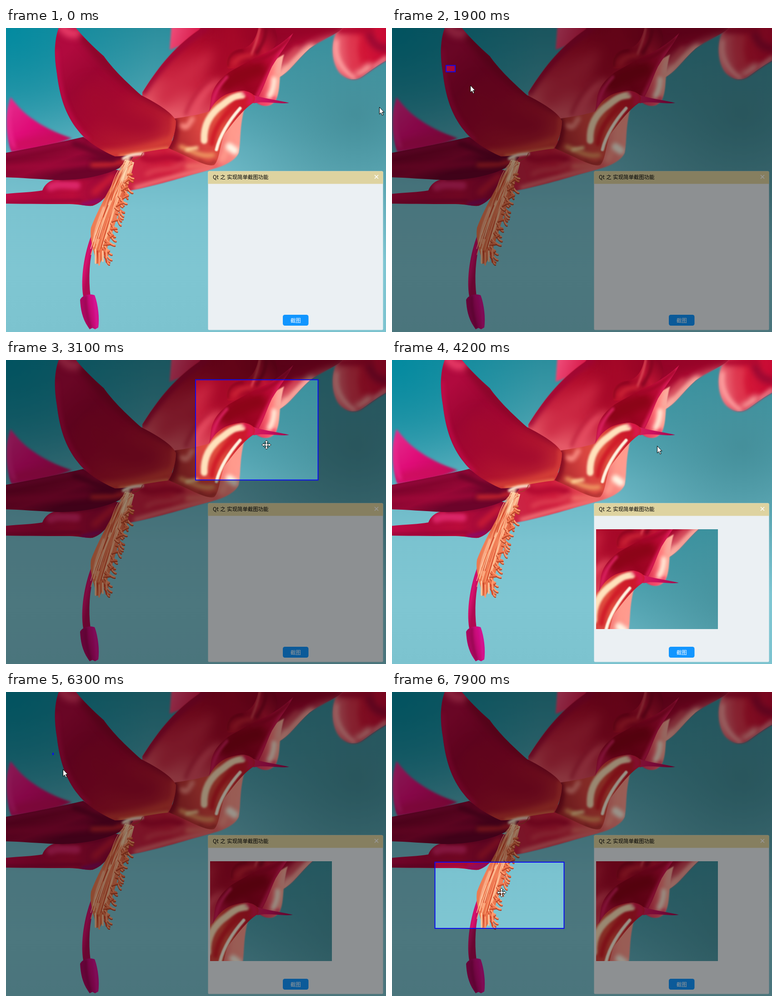
An HTML page with a canvas that plays this animation: 836 by 670 pixels, repeating every 8000 ms.

```html
<!DOCTYPE html>
<html lang="zh-CN">
<head>
<meta charset="utf-8">
<title>截图</title>
<style>
  html, body { margin: 0; width: 100%; height: 100%; overflow: hidden; background: #6ab5c2; }
  canvas, svg { position: absolute; left: 0; top: 0; display: block; }
  #photo { will-change: transform; }
  #preview { left: 449px; top: 373px; }
  text { font-family: "Noto Sans CJK SC", "Noto Sans CJK JP", "Noto Sans", sans-serif; }
</style>
</head>
<body>
<canvas id="photo" width="836" height="670"></canvas>
<svg width="836" height="670" viewBox="0 0 836 670">
  <rect x="444.5" y="315.5" width="385" height="350" rx="2.5" fill="#ebf0f3"/>
  <path d="M444.5,343.5 V318 Q444.5,315.5 447,315.5 H827 Q829.5,315.5 829.5,318 V343.5Z" fill="#ded3a0"/>
  <text x="455" y="333" font-size="11.4" word-spacing="1">Qt 之 实现简单截图功能</text>
  <path d="M811,324 l8,8 m0,-8 l-8,8" stroke="#fff" stroke-width="1.5"/>
  <rect x="609" y="632" width="56.5" height="24" rx="4.5" fill="#1296ff"/>
  <text x="637.3" y="648.7" font-size="11.5" fill="#fff" text-anchor="middle">截图</text>
</svg>
<canvas id="preview" width="268" height="220"></canvas>
<svg width="836" height="670" viewBox="0 0 836 670">
  <path id="shade" fill="#000" fill-opacity=".4" fill-rule="evenodd"/>
  <rect id="box" fill="none" stroke="#0a0af0" stroke-width="2"/>
  <path id="cursor" fill="#fff" stroke="#000" stroke-width="1" stroke-linejoin="round"/>
</svg>
<script>
const $ = id => document.getElementById(id);
const W = 836, H = 670;
const ctx = $('photo').getContext('2d');

// ---- Backdrop painting ----
function linear(x0, y0, x1, y1, ...colors) {
  const g = ctx.createLinearGradient(x0, y0, x1, y1);
  colors.forEach((c, i) => g.addColorStop(i / (colors.length - 1), c));
  return g;
}

function glow(x, y, r, rgb, alpha) {
  const g = ctx.createRadialGradient(x, y, 0, x, y, r);
  g.addColorStop(0, `rgba(${rgb},${alpha})`);
  g.addColorStop(1, `rgba(${rgb},0)`);
  ctx.fillStyle = g;
  ctx.fillRect(x - r, y - r, 2 * r, 2 * r);
}

function line(d, color, width, blur = 0) {
  ctx.filter = blur ? `blur(${blur}px)` : 'none';
  ctx.strokeStyle = color;
  ctx.lineWidth = width;
  ctx.stroke(new Path2D(d));
  ctx.filter = 'none';
}

// A filled shape with soft strokes [path, colour, width, blur] clipped inside it.
function petal(d, fill, soft, ...marks) {
  const p = new Path2D(d);
  ctx.save();
  if (soft) ctx.filter = `blur(${soft}px)`;
  ctx.fillStyle = fill;
  ctx.fill(p);
  ctx.clip(p);
  marks.forEach(m => line(...m));
  ctx.restore();
}

function paintSky() {
  ctx.fillStyle = linear(0, 0, 0, H, '#2c8e9d', '#459fad', '#68b6c4', '#7bc3d0', '#7fc6d2', '#7cc3cf');
  ctx.fillRect(0, 0, W, H);
  glow(0, 0, 330, '0,138,160', .95);
  glow(770, 190, 330, '68,142,153', .95);
}

function paintBackPetals() {
  petal('M364,-5 L360,48 L440,20 V-5Z', linear(360, 0, 420, 20, '#f0507c', '#d81c4c'), 2);
  petal('M725,12 C714,40 717,80 735,100 C750,114 768,118 785,106 C805,92 820,80 840,70 V-5 H740Z',
    linear(718, 40, 836, 30, '#f27c84', '#d41838', '#c80a34'), 2,
    ['M727,30 C721,62 738,92 766,110', '#ffa8a6', 9, 5],
    ['M775,100 L800,85', '#ffb8b0', 14, 7],
    ['M770,20 C758,45 762,65 775,85', '#e03a50', 14, 8],
    ['M798,10 C803,30 815,45 836,45', '#960832', 16, 7],
    ['M810,85 L836,66', '#f08a90', 9, 5],
    ['M735,5 L800,3', '#b00830', 16, 6]);
  petal('M560,-5 H744 C735,12 700,22 668,45 C640,70 625,95 602,108 C585,90 570,40 560,-5Z',
    linear(620, 0, 660, 70, '#8c0426', '#a80830', '#e87c80'), 1.5,
    ['M602,106 C620,85 640,62 672,42', '#ffb4a6', 15, 6],
    ['M600,8 L730,-2', '#960428', 30, 9],
    ['M615,75 L640,45', '#d84858', 10, 6]);
  petal('M300,142 C330,95 365,45 425,4 L432,-5 H575 C560,60 510,110 472,130 C458,150 452,170 447,200 L373,225 L300,200Z',
    linear(480, 0, 400, 200, '#9a0526', '#b40f2e', '#c92440', '#e65a68'), 1,
    ['M302,142 C335,90 380,40 440,0', '#9e0634', 14, 6],
    ['M345,160 C375,120 410,90 450,70', '#cc2a44', 32, 14],
    ['M412,190 C422,160 437,135 468,115', '#e64e62', 15, 7],
    ['M490,0 C510,25 485,60 470,95', '#a50828', 45, 16],
    ['M395,190 C405,160 425,130 450,110', '#b81a38', 5, 4]);
  petal('M10,152 C-3,190 0,240 12,273 L60,268 C100,258 125,250 145,243 C110,232 78,215 55,198 C35,184 20,165 10,152Z',
    linear(5, 160, 110, 260, '#e42c8c', '#e00c78', '#c40a5c'), 2.5,
    ['M15,262 C40,252 80,247 120,250', '#cc0e5c', 18, 8],
    ['M8,175 C4,210 8,240 18,262', '#ec2c90', 6, 4]);
  petal('M530,160 C512,210 518,245 512,275 C505,292 480,305 450,312 C400,325 340,345 270,359 C252,335 250,300 255,272 L360,245 L440,290 C470,240 490,190 515,160Z',
    linear(280, 320, 510, 260, '#cc2444', '#d01c3c', '#e85258', '#ff9c90'), 1,
    ['M300,284 C325,300 350,275 385,290', '#b40c32', 16, 5],
    ['M285,352 C340,336 400,319 450,309', '#f2787a', 9, 4],
    ['M310,322 C335,305 360,320 390,298', '#dc3c50', 10, 5],
    ['M508,195 C500,230 495,255 475,290', '#ff9a8c', 15, 6],
    ['M400,305 L450,303', '#ee6a66', 12, 5],
    ['M492,262 L503,270', '#fff6e6', 17, 4]);
}

function paintCalyx() {
  petal('M612,58 C598,100 606,135 594,158 C582,178 560,174 546,160 C560,140 565,110 582,75Z',
    linear(555, 130, 605, 130, '#dc2c50', '#ff7478', '#ffb09c'), 1,
    ['M590,112 C590,128 586,140 580,150', '#fff2de', 11, 4],
    ['M605,75 L598,100', '#f8aaa0', 10, 4],
    ['M556,163 C570,169 582,166 591,155', '#f2446a', 8, 3]);
  petal('M556,-5 C550,30 535,45 510,47 C490,52 480,70 488,89 C510,92 535,75 560,62 C590,50 608,30 588,-5Z',
    linear(490, 80, 590, 10, '#bc122c', '#a00626', '#be1434', '#8c0424'), .6,
    ['M558,0 C553,30 545,45 540,58', '#e0505a', 4, 2],
    ['M572,0 C572,25 560,40 552,55', '#820420', 7, 3],
    ['M488,84 C486,62 500,50 520,50', '#86041e', 5, 3],
    ['M502,78 C512,62 525,62 538,60', '#cc2436', 10, 5]);
  petal('M632,11 C615,28 585,50 550,65 C530,75 508,88 490,98 C468,115 455,130 451,155 L447,186 C465,160 490,140 522,138 C540,142 545,156 555,152 C568,130 572,112 585,85 C603,55 620,35 632,11Z',
    linear(460, 150, 620, 30, '#c01040', '#980420', '#b40830', '#d2184e'), .5,
    ['M485,125 C505,108 530,98 555,92', '#8c0418', 34, 8],
    ['M625,22 C600,55 578,100 553,150', '#dc1c58', 8, 3],
    ['M452,180 C456,145 468,128 486,108', '#da2260', 6, 2.5],
    ['M545,74 C575,66 600,48 622,24', '#a00628', 7, 3]);
  petal('M520,138 C555,155 590,157 623,165 C600,169 570,160 545,166Z',
    linear(530, 150, 620, 165, '#d82450', '#cc1060', '#a00a4c'), .4);
  petal('M368,200 C400,195 430,190 447,184 C460,160 480,140 522,138 C545,142 552,152 545,164 C520,180 495,215 480,235 C470,260 470,290 458,302 C440,307 405,285 358,265 C370,245 374,225 368,200Z',
    linear(375, 240, 520, 190, '#b42c30', '#d84440', '#e2503e', '#cc1a2c'), .5,
    ['M370,203 C378,225 370,250 360,265', '#860c22', 13, 4],
    ['M388,215 C398,225 402,212 410,200', '#f88a80', 11, 4],
    ['M436,248 C434,210 453,185 478,168 C488,160 500,150 520,148', '#ffe2bc', 15, 2],
    ['M453,255 C456,226 475,195 508,166', '#d01c28', 11, 3],
    ['M385,262 C415,275 435,285 455,280', '#f09a62', 10, 4],
    ['M398,268 L420,264', '#ffd69c', 7, 3],
    ['M425,293 C440,303 452,301 460,295', '#a83030', 6, 3],
    ['M463,268 C470,238 490,205 515,177', '#fff4e0', 7, 1.2],
    ['M525,142 C540,148 545,158 535,166', '#dc1850', 11, 4]);
}

function paintFrontPetals() {
  petal('M-5,366 C30,362 60,362 80,358 C85,345 95,336 112,333 L160,325 L230,310 L255,315 C240,350 215,385 190,392 C175,393 160,388 140,388 C100,388 50,388 -5,387Z',
    linear(0, 365, 220, 375, '#be0a46', '#b0083c', '#ba0c3a', '#960838'), .6,
    ['M98,350 C115,342 135,346 155,347', '#da2668', 18, 4],
    ['M0,384 C60,384 120,380 165,380', '#960638', 6, 3],
    ['M168,389 L205,380', '#8c0a66', 8, 3],
    ['M120,333 C160,333 200,330 240,318', '#8a0632', 6, 3],
    ['M195,362 C210,347 225,337 235,327', '#c81a36', 15, 6]);
  petal('M-5,276 C50,266 130,250 170,240 C200,262 240,275 280,284 C270,300 245,312 225,319 C180,333 150,335 110,335 C70,333 30,330 -5,329Z',
    linear(60, 255, 90, 334, '#7c042e', '#84052e', '#960836', '#6c042a'), .6,
    ['M0,280 C60,268 120,256 170,246', '#9c0a40', 6, 4],
    ['M0,308 C60,302 110,307 180,298', '#9e0838', 12, 6],
    ['M190,302 C220,302 240,301 268,292', '#cc262e', 10, 5],
    ['M150,255 C180,265 210,280 235,288', '#6a0428', 12, 5]);
  petal('M118,-5 C106,22 105,60 112,100 C118,150 130,190 158,225 C175,248 205,268 240,283 C275,282 310,270 356,266 C368,245 374,225 374,205 C365,185 330,165 297,148 C260,115 235,90 215,62 C190,40 165,15 150,-5Z',
    linear(125, 60, 330, 270, '#b00a3e', '#9c0632', '#a40830', '#b2162f', '#c42c34'), .6,
    ['M122,-5 C130,8 140,15 158,12', '#e63a66', 20, 7],
    ['M170,20 C220,80 260,130 365,180', '#860628', 16, 8],
    ['M111,50 C114,130 130,195 180,245', '#c40c4c', 7, 4],
    ['M190,150 C230,200 280,220 320,215', '#a20a2e', 45, 18],
    ['M215,277 C270,277 320,262 362,247', '#da4638', 13, 7],
    ['M250,282 C280,277 320,270 358,264', '#f58a55', 5, 3],
    ['M369,200 C372,220 366,240 360,255', '#d63e3a', 8, 4]);
}

function paintStamens() {
  petal('M188,456 C173,495 163,550 170,592 L186,592 C181,550 183,510 195,468Z',
    linear(168, 500, 190, 505, '#ac0856', '#d81270', '#b00a52'), .5);
  petal('M163,599 C168,588 185,585 195,589 C203,610 206,640 203,660 L196,664 L190,661 L184,664 L180,658 C168,640 164,620 163,599Z',
    linear(163, 630, 204, 622, '#b00860', '#a80860', '#cc0c7c', '#d0109a'), .6,
    ['M176,592 C174,615 180,640 186,660', '#980850', 4, 2],
    ['M195,592 L201,660', '#d81890', 4, 2]);
  petal('M262,290 C246,325 208,385 187,440 C183,468 194,490 199,520 L207,518 C230,480 240,420 258,380 C268,350 276,320 282,296Z',
    linear(270, 290, 200, 520, '#ffd2a8', '#d85838', '#f0805a', '#ec7a50', '#e06c40'), .6);

  let seed = 7;
  const rnd = () => (seed = seed * 16807 % 2147483647) / 2147483647;
  const tones = ['#ffc59b', '#d0482c', '#ff9d72', '#f07850'];
  for (let i = 0; i < 46; i++) {
    const y = 350 + rnd() * 150, mid = 274 - (y - 300) * .35;
    const x = mid - 24 + rnd() * 30;
    line(`M${262 + rnd() * 16},${292 + rnd() * 8} Q${x + 18},${y - 65} ${x},${y}`, tones[i % 4], 1.5);
  }
  // Anthers along the right edge
  for (let i = 0; i < 44; i++) {
    const y = 322 + i * 4.3, x = 276 - (y - 325) * .3 - rnd() * 16;
    const dx = 5 + rnd() * 8, dy = 5 + rnd() * 9 - (i % 4 ? 0 : 12);
    line(`M${x},${y + 2} q${dx * .6},${dy} ${dx},${dy}`, '#b84426', 4);
    line(`M${x},${y} q${dx * .6},${dy} ${dx},${dy}`, tones[i % 2 ? 2 : 3], 3.2);
  }
  for (let i = 0; i < 7; i++) line(`M${197 + i * 4},${488 + i % 3 * 4} l${i % 2 * 4},${30 - i * 2}`, tones[i % 4], 3.5);
  line('M215,395 C206,420 196,440 193,470', '#ffc8a6', 3, 1.5);
  line('M268,286 C267,300 262,318 256,335', '#ffe0b8', 8, 3);
  line('M258,288 C272,278 288,279 300,277', '#fff0d4', 6, 2);
  line('M276,291 C290,292 298,284 300,276', '#a83c30', 1.5, .5);
}

ctx.lineCap = 'round';
paintSky();
paintBackPetals();
paintCalyx();
paintFrontPetals();
paintStamens();
$('preview').getContext('2d').drawImage($('photo'), 441, 47, 268, 220, 0, 0, 268, 220);

// ---- Motion: rows of [time, ...values], linear between rows ----
const ARROW = 'M.5,.5 V16 L4,12.7 L6.6,18.5 L9,17.4 L6.5,11.7 H11Z';
const CROSS = 'M0,-10 L4,-5.5 H1.5 V-1.5 H5.5 V-4 L10,0 L5.5,4 V1.5 H1.5 V5.5 H4 L0,10 L-4,5.5 H-1.5 V1.5 H-5.5 V4 L-10,0 L-5.5,-4 V-1.5 H-1.5 V-5.5 H-4Z';

const pointer = [
  [0, 821, 174], [700, 640, 641], [800, 635, 641], [900, 604, 580], [1000, 535, 442],
  [1700, 118, 82], [1800, 118, 82], [2300, 389, 302], [2400, 389, 302], [2500, 381, 294],
  [2700, 274, 226], [3100, 573, 187], [3200, 599, 188], [3400, 597, 191], [3600, 597, 191],
  [3700, 583, 189], [4400, 583, 189], [5100, 640, 640], [5200, 636, 638], [5300, 612, 570],
  [5400, 560, 470], [6100, 103, 135], [6200, 103, 135], [6300, 125, 170], [7000, 388, 281],
  [7200, 388, 281], [7400, 250, 202], [7600, 268, 300], [7900, 241, 442]
];
const firstBox = [
  [1900, 119, 82.5, 20, 14], [2300, 119, 82.5, 269.5, 220.5], [2700, 119, 82.5, 269.5, 220.5],
  [3100, 417, 43.5, 269.5, 221], [3200, 443, 45, 269.5, 221], [3300, 443, 45, 269.5, 221],
  [3400, 442, 47, 269.5, 221]
];
const secondBox = [
  [6300, 103, 135, 1, 3], [7000, 103, 135, 284, 146], [7400, 103, 135, 284, 146],
  [7600, 121, 233, 284, 146], [7900, 94.5, 375, 284, 146]
];

function at(track, t) {
  const i = track.findIndex(k => k[0] > t);
  if (i < 0) return track[track.length - 1].slice(1);
  if (i === 0) return track[0].slice(1);
  const a = track[i - 1], b = track[i], u = (t - a[0]) / (b[0] - a[0]);
  return a.slice(1).map((v, j) => v + (b[j + 1] - v) * u);
}

const within = (t, a, b) => t >= a && t < b;

function render(time) {
  const t = Math.floor(time % 8000 / 100) * 100;
  const dim = within(t, 1000, 4200) || t >= 5400;
  const track = within(t, 1900, 4200) ? firstBox : t >= 6300 ? secondBox : null;
  let shade = dim ? `M0,0H${W}V${H}H0Z` : '';
  if (track) {
    const [x, y, w, h] = at(track, t);
    shade += `M${x},${y}h${w}v${h}h${-w}Z`;
    Object.entries({ x, y, width: w, height: h }).forEach(([k, v]) => $('box').setAttribute(k, v));
  }
  $('shade').setAttribute('d', shade);
  $('box').style.display = track ? '' : 'none';
  $('preview').style.display = t >= 4200 ? 'block' : 'none';

  const moving = within(t, 2700, 4200) || t >= 7400;
  const [cx, cy] = at(pointer, t).map(Math.round);
  $('cursor').setAttribute('d', moving ? CROSS : ARROW);
  $('cursor').setAttribute('transform', `translate(${cx},${cy})`);
}

const start = performance.now();
(function tick() {
  render(performance.now() - start);
  requestAnimationFrame(tick);
})();
</script>
</body>
</html>
```
